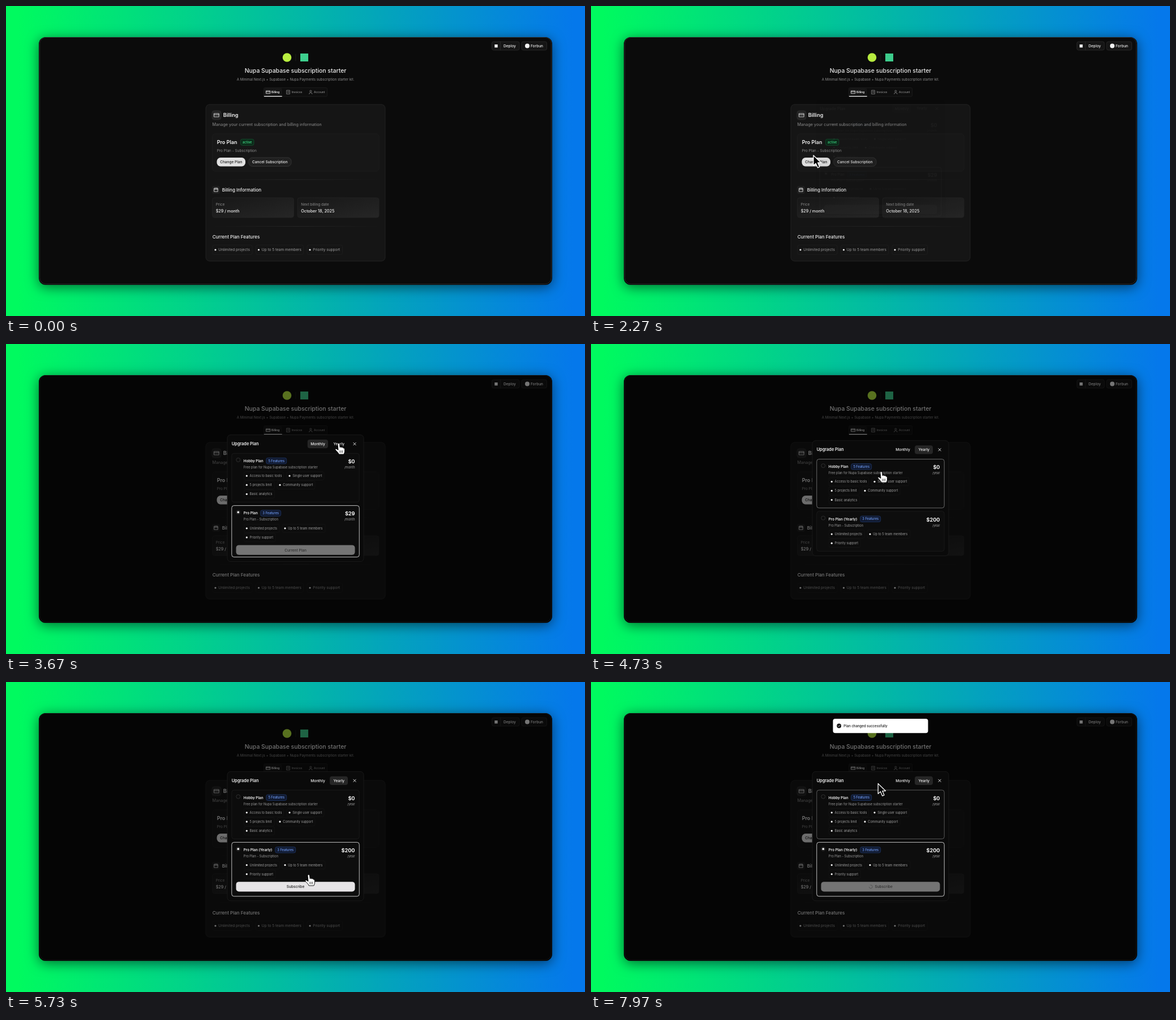
Recreate the animation shown at these times as an HTML page. Size 1023x548 px, loop 8000 ms.

```html
<!DOCTYPE html>
<html lang="en">
<head>
<meta charset="utf-8">
<title>Subscription starter</title>
<style>
  html, body { margin: 0; height: 100%; overflow: hidden; }
  svg {
    display: block; width: 100%; height: 100%;
    background: linear-gradient(90deg, #00fa5f 2%, #0578eb 98%);
    font-family: Inter, sans-serif;
  }
  #window { filter: drop-shadow(0 4px 11px rgba(0, 0, 0, .55)); }
</style>
</head>
<body>
<svg viewBox="0 0 1023 548">
  <defs>
    <clipPath id="inside"><rect x="58" y="55" width="907" height="438" rx="12"/></clipPath>
    <linearGradient id="tile" x2="1" y2="1">
      <stop stop-color="#171717"/><stop offset="1" stop-color="#262626"/>
    </linearGradient>
    <linearGradient id="rule">
      <stop stop-color="#2c2c2c" stop-opacity="0"/>
      <stop offset=".5" stop-color="#2c2c2c"/>
      <stop offset="1" stop-color="#2c2c2c" stop-opacity="0"/>
    </linearGradient>
  </defs>
  <rect id="window" x="58" y="55" width="907" height="438" rx="12" fill="#050505"/>
  <rect x="59.5" y="55.5" width="904" height="436" rx="11" fill="#0b0b0b" stroke="#363636" stroke-width=".8"/>
  <g id="page"></g>
  <g id="live"></g>
</svg>
<script>
const LOOP = 8000;
const OPEN = 2250, YEARLY = 3850, SELECT = 5290, SUBSCRIBE = 6090, TOAST = 7250;
const GREY = '#8f8f8f', WHITE = '#f4f4f4';

// Drawing helpers: y of a text is the middle of its capitals
const text = (x, y, size, str, fill = WHITE, weight = 400, anchor = 'start') =>
  `<text x="${x}" y="${y + size * .36}" font-size="${size}" fill="${fill}" font-weight="${weight}" text-anchor="${anchor}">${str}</text>`;
const box = (x1, y1, x2, y2, r, fill, stroke = 'none', extra = '') =>
  `<rect x="${x1}" y="${y1}" width="${x2 - x1}" height="${y2 - y1}" rx="${r}" fill="${fill}" stroke="${stroke}" stroke-width=".8" ${extra}/>`;
const dot = (x, y, r, fill, stroke = 'none') =>
  `<circle cx="${x}" cy="${y}" r="${r}" fill="${fill}" stroke="${stroke}" stroke-width=".8"/>`;
const line = (d, stroke = WHITE, width = .8) =>
  `<path d="${d}" fill="none" stroke="${stroke}" stroke-width="${width}" stroke-linecap="round" stroke-linejoin="round"/>`;
const chip = (x, y, size, str, width, edge) =>
  box(x - 5, y - size * 1.3, x + width, y + size * 1.3, 3, 'none', edge) +
  dot(x, y, 1.6, WHITE) + text(x + 5.3, y, size, str, '#a0a0a0');
const card = (x, y, s, color = WHITE) =>
  line(`M${x - s} ${y - s * .7}h${2 * s}v${1.4 * s}h${-2 * s}zM${x - s} ${y - s * .2}h${2 * s}`, color);

function pageMarkup() {
  const header =
    box(858.5, 63, 907, 78, 3, '#151515', '#2d2d2d') + line('M873.5 63V78', '#2d2d2d') +
    box(863.3, 68, 868.7, 73.4, 0, WHITE) + text(879, 70.7, 6.5, 'Deploy', WHITE, 500) +
    box(911, 63, 955.5, 78, 3, '#151515', '#2d2d2d') +
    dot(921, 70.6, 4, WHITE) + text(927, 70.7, 6.5, 'Forbun', WHITE, 500) +
    dot(496.5, 91, 7.8, '#b9ee40') + line('M511.8 85V97', '#222') +
    box(520, 84, 534, 98, 0, '#3ecf8e') +
    text(511.5, 114.5, 10.45, 'Nupa Supabase subscription starter', '#ededed', 500, 'middle') +
    text(511.5, 130.2, 6.12, 'A Minimal Next.js + Supabase + Nupa Payments subscription starter kit.', GREY, 400, 'middle');
  const tabs =
    box(455.5, 144.5, 567.5, 160, 2, '#0e0e0e', '#1f1f1f') +
    box(456, 145, 487.5, 159, 2, '#161616') + line('M456.3 159.6H487.3', WHITE, 1.2) +
    card(463.3, 152.3, 3.4) + text(469, 152.4, 4.85, 'Billing', WHITE, 600) +
    line('M496 149h5.4v6.6h-5.4zM497.4 151h2.6M497.4 153h2.6', GREY) +
    text(504.5, 152.4, 4.75, 'Invoices', GREY, 500) +
    dot(538.3, 150.6, 1.5, 'none', GREY) + line('M535.6 155.5q0-2.4 2.7-2.4t2.7 2.4', GREY) +
    text(544, 152.4, 4.85, 'Account', GREY, 500);
  const plan =
    box(353, 174, 670, 451, 7, '#151515', '#272727') +
    box(364, 185, 380, 201, 4, '#242424', '#2e2e2e') + card(372, 193, 4.2) +
    text(383.7, 193, 9.1, 'Billing', WHITE, 600) +
    text(364.5, 209.3, 7.23, 'Manage your current subscription and billing information', GREY) +
    box(364.5, 226, 659, 292, 5, '#171717', '#1f1f1f') +
    text(372.7, 240.8, 9, 'Pro Plan', WHITE, 600) +
    box(414.5, 235.3, 438, 246.3, 3, '#0c2b1a', '#155230') +
    text(426.2, 240.6, 5.75, 'active', '#3fdc86', 500, 'middle') +
    text(372.7, 256, 6.45, 'Pro Plan - Subscription', GREY) +
    box(372.5, 268, 423, 283.4, 6.5, '#e2e2e2') +
    text(397.8, 275.8, 6.5, 'Change Plan', '#1c1c1c', 500, 'middle') +
    box(428.8, 268, 504, 283.4, 6.5, '#202020', '#393939') +
    text(466.4, 275.8, 6.5, 'Cancel Subscription', WHITE, 500, 'middle');
  const info =
    box(365, 306.5, 659, 307.2, 0, 'url(#rule)') +
    box(364, 318, 378, 332, 3.5, '#1f1f1f') +
    line('M368 322.3h6.2v5.8h-6.2zM368 324.2h6.2M369.7 321.4v1M372.5 321.4v1') +
    text(381.7, 324.8, 8.05, 'Billing Information', WHITE, 500) +
    box(364.5, 339, 508.5, 374, 4, 'url(#tile)', '#242424') +
    text(370.7, 350.3, 6.45, 'Price', GREY) + text(370.7, 362.6, 7.2, '$29 / month', WHITE, 500) +
    box(515, 339, 659, 374, 4, 'url(#tile)', '#242424') +
    text(521.3, 350.3, 6.45, 'Next billing date', GREY) + text(521.3, 362.6, 7.2, 'October 18, 2025', WHITE, 500) +
    box(365, 389.2, 659, 389.9, 0, 'url(#rule)') +
    text(364.7, 407.7, 8.05, 'Current Plan Features', WHITE, 500) +
    chip(370, 431, 6.5, 'Unlimited projects', 65, '#202020') +
    chip(446.5, 431, 6.5, 'Up to 5 team members', 79, '#202020') +
    chip(537, 431, 6.5, 'Priority support', 57.5, '#202020');
  return header + tabs + plan + info;
}

// Motion
const clamp = u => Math.min(1, Math.max(0, u));
const ease = u => u * u * (3 - 2 * u);
const ramp = (t, start, length) => ease(clamp((t - start) / length));

const track = [
  [400, 512, 552], [1280, 393, 264], [2720, 393, 264], [2870, 402, 279],
  [3560, 588, 176], [3900, 588, 176], [4500, 513, 226], [4850, 513, 226],
  [5180, 535, 333], [5330, 535, 333], [5730, 535, 341], [6020, 526, 357],
  [6250, 526, 357], [6600, 526, 337], [7620, 526, 337], [7870, 529, 225], [8000, 501, 166.5]
];
function pointerAt(t) {
  const i = track.findIndex(k => k[0] > t);
  if (i < 1) return { x: track[0][1], y: track[0][2] };
  const [t0, x0, y0] = track[i - 1], [t1, x1, y1] = track[i];
  const u = (t - t0) / (t1 - t0), e = t0 >= 7620 ? u : ease(u);
  return { x: x0 + (x1 - x0) * e, y: y0 + (y1 - y0) * e };
}

// The dialog stays centred; its height gives every other position
function layoutAt(t) {
  const h = 224 - 20.5 * ramp(t, YEARLY, 200) + 25 * ramp(t, SELECT, 230);
  return { head: 288.6 - h / 2, top: 272.6 - h / 2, bottom: 272.6 + h / 2 };
}
function hit(t) {
  if (t < OPEN + 200) return '';
  const { x, y } = pointerAt(t), { head, bottom } = layoutAt(t);
  if (x > 572 && x < 604 && Math.abs(y - head) < 8) return 'yearly';
  if (x < 399 || x > 624) return '';
  if (y > head + 16.7 && y < head + 103) return 'hobby';
  if (y > head + 109 && y < bottom - 8) return 'pro';
  return '';
}
// Share of the last 150 ms spent over a part: a soft hover
const hover = (t, part) => [0, 1, 2, 3, 4].filter(k => hit(t - k * 30) === part).length / 5;
const edge = amount => `rgb(${[1, 1, 1].map(() => Math.round(30 + 100 * amount))})`;

function planMarkup(y, name, badgeX, count, about, price, per, chosen) {
  return (chosen ? dot(410.3, y - 1.7, 3.5, '#1c1c1c', '#333') + dot(410.3, y - 1.7, 1.8, '#fff')
                 : dot(410.3, y - 1.7, 3.5, '#0d0d0d', '#383838')) +
    text(419.8, y, 6.3, name, WHITE, 600) +
    box(badgeX, y - 5.3, badgeX + 36, y + 5.2, 3, '#111a30', '#1f3566') +
    text(badgeX + 18, y, 5.7, count + ' Features', '#6f9cf5', 500, 'middle') +
    text(419.8, y + 11.2, 5.64, about, '#9a9a9a') +
    text(616.5, y + 1, 9.1, price, WHITE, 700, 'end') +
    text(616.5, y + 11.2, 5.6, per, '#a0a0a0', 400, 'end');
}

function buttonMarkup(t, y) {
  const busy = t >= SUBSCRIBE, monthly = t < YEARLY;
  const shown = monthly ? 1 : t < SELECT ? 1 - ramp(t, YEARLY, 100) : ramp(t, SELECT, 200);
  if (t >= YEARLY && t < SELECT) return '';
  const dim = monthly || busy;
  const spinner = busy
    ? `<g transform="translate(494.3 ${y + 8.7}) rotate(${t * .36})">${line('M0-3A3 3 0 1 1-3 0', '#4a4a4a', .7)}</g>` : '';
  return `<g opacity="${shown}">` + box(406.5, y, 616.5, y + 17.4, 5, dim ? '#747474' : '#e6e4e6') +
    text(busy ? 517.2 : 511.5, y + 8.8, 6.5, monthly ? 'Current Plan' : 'Subscribe', dim ? '#303030' : '#1a1a1a', 500, 'middle') +
    spinner + '</g>';
}

function dialogMarkup(t) {
  const open = ramp(t, OPEN, 200);
  if (!open) return '';
  const { head, top, bottom } = layoutAt(t);
  const yearly = t >= YEARLY, chosen = !yearly || t >= SELECT;
  const per = yearly ? '/year' : '/month', zoom = .95 + .05 * open;
  const tabX = yearly ? [572, 604] : [532.7, 569];
  const chips = [
    [425.3, 56.5, 'Access to basic tools', 65], [501, 56.5, 'Single user support', 61],
    [425.3, 72.6, '5 projects limit', 49], [484, 72.6, 'Community support', 62],
    [425.3, 88.7, 'Basic analytics', 49],
    [425.3, 149.2, 'Unlimited projects', 58], [493, 149.2, 'Up to 5 team members', 71],
    [425.3, 165.3, 'Priority support', 51]
  ];
  return box(58, 55, 965, 493, 12, '#000', 'none', `opacity="${.52 * open}"`) +
    `<g opacity="${open}" transform="translate(511.5 272.6) scale(${zoom}) translate(-511.5 -272.6)">` +
    box(391, top, 632, bottom, 6, '#0a0a0a', '#1d1d1d') +
    text(398.7, head, 7.35, 'Upgrade Plan', WHITE, 600) +
    box(tabX[0], head - 7.6, tabX[1], head + 7.6, 4, '#262626') +
    text(551, head, 6.6, 'Monthly', WHITE, 500, 'middle') +
    text(588.3, head, 6.5, 'Yearly', WHITE, 500, 'middle') +
    line(`M613.8 ${head - 2.2}l4.4 4.4m0-4.4l-4.4 4.4`, WHITE, .9) +
    box(398.8, head + 16.7, 624.2, head + 103, 4, '#0c0c0c', edge(hover(t, 'hobby'))) +
    planMarkup(head + 30, 'Hobby Plan', 459.7, 5, 'Free plan for Nupa Supabase subscription starter', '$0', per, false) +
    box(398.8, head + 109, 624.2, bottom - 8, 4, '#0d0d0d', chosen ? '#f0f0f0' : edge(hover(t, 'pro'))) +
    planMarkup(head + 122.5, yearly ? 'Pro Plan (Yearly)' : 'Pro Plan', yearly ? 475.7 : 449.7, 3,
      'Pro Plan - Subscription', yearly ? '$200' : '$29', per, chosen) +
    chips.map(([x, y, str, w]) => chip(x, head + y, 5.66, str, w, '#161616')).join('') +
    buttonMarkup(t, head + 178.8) + '</g>';
}

function toastMarkup(t) {
  if (t < TOAST) return '';
  const e = ramp(t, TOAST, 400);
  return `<g clip-path="url(#inside)"><g opacity="${e}" transform="translate(0 ${(e - 1) * 26})">` +
    box(427.5, 65, 595.5, 90.3, 4, '#fff') + dot(438.2, 77.5, 3.9, '#111') +
    line('M436.5 77.6l1.2 1.2 2.3-2.5', '#fff') +
    text(446.3, 77.6, 6.05, 'Plan changed successfully', '#161616', 500) + '</g></g>';
}

const ARROW = '<path d="M0 0V18L4.2 14.2 7.5 21.8 10.8 20.4 7.6 13H13.2Z" fill="#000" stroke="#fff" stroke-width="1.3" stroke-linejoin="round"/>';
const HAND = '<path d="M-2 1.4a1.7 1.7 0 0 1 3.4-.4L2.2 7q.4-1.3 1.6-1.1T5.3 7.2q.5-1 1.6-.6T8.2 8.2q.7-.6 1.4 0T10.4 10v4q0 2-1.6 5H.2q-.8-2.2-3-4.4T-6.3 10.4q.5-1.7 2.2-1L-1 11.4Z" fill="#fff" stroke="#000" stroke-width=".9" stroke-linejoin="round"/>' +
  line('M1.9 12.5v3.6M4.2 12.5v3.6M6.5 12.5v3.6', '#000', .7);
function pointerMarkup(t) {
  if (t < track[0][0]) return '';
  const { x, y } = pointerAt(t);
  return `<g transform="translate(${x} ${y})">${hit(t) ? HAND : ARROW}</g>`;
}

const live = document.getElementById('live');
document.getElementById('page').innerHTML = pageMarkup();
function draw() {
  const t = performance.now() % LOOP;
  live.innerHTML = dialogMarkup(t) + toastMarkup(t) + pointerMarkup(t);
  requestAnimationFrame(draw);
}
draw();
</script>
</body>
</html>
```
